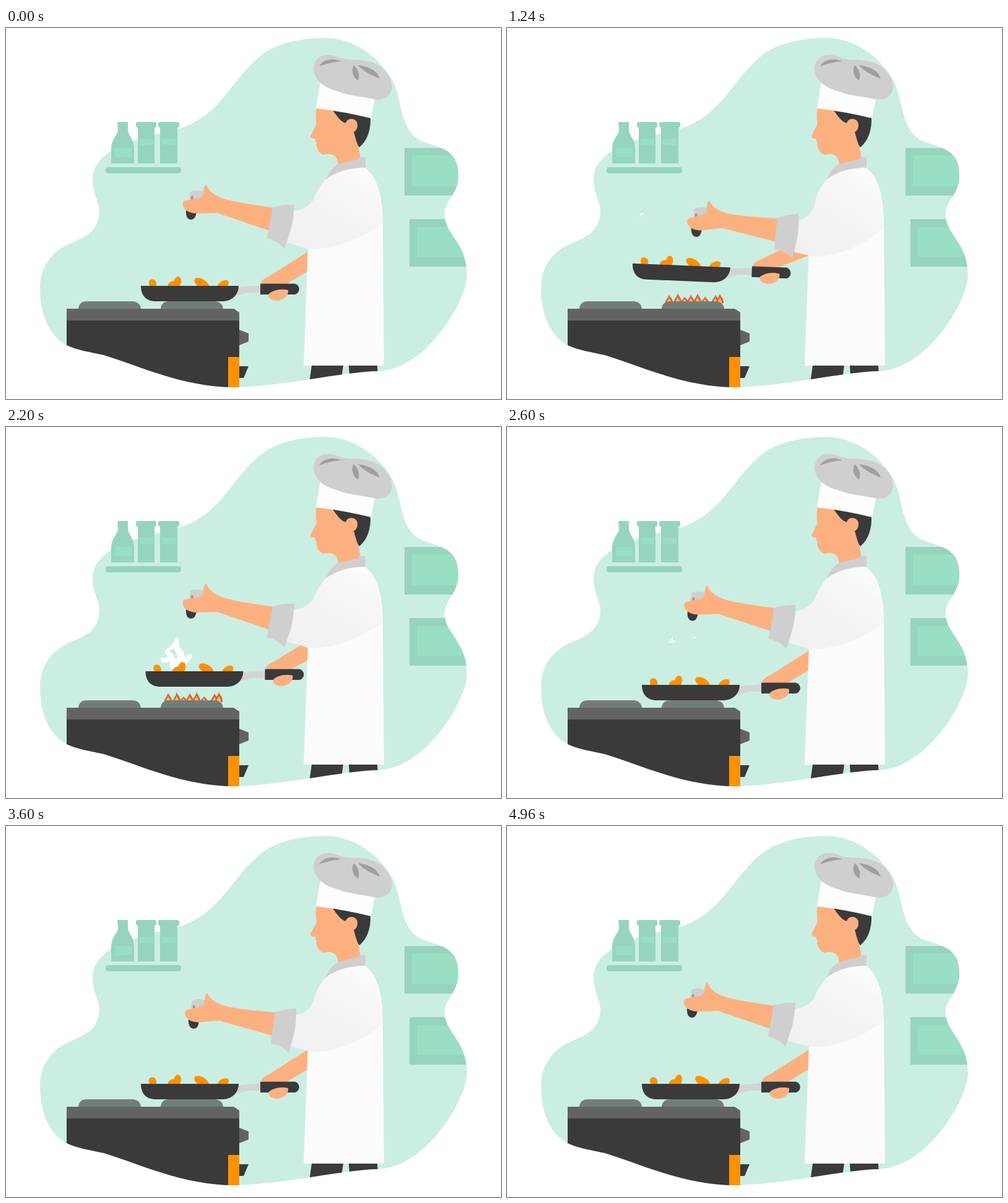
An HTML page for the animation above (5000 ms loop, 800 by 600 pixels).

```html
<!DOCTYPE html>
<html lang="en">
<head>
<meta charset="utf-8">
<title>Chef at the stove</title>
<style>
html, body { margin: 0; width: 100%; height: 100%; overflow: hidden; background: #fff; }
svg { display: block; width: 800px; height: 600px; }
.dark { fill: #3a3a3a; }
.skin { fill: #fdb07f; }
.food { fill: #ff9100; }
.cloth { fill: #cfcfcf; }
.shelf { fill: #97d4bd; }
.pale { fill: #99dfc3; }
</style>
</head>
<body>
<svg viewBox="0 0 800 600">
  <defs>
    <path id="blob" d="M510 16C560 14 600 45 622 80C642 112 634 165 672 183C700 194 731 195 731 238C731 272 706 280 709 306C712 335 745 350 745 400C745 440 680 553 600 555C545 556 455 578 376 581C290 583 215 546 158 529C135 524 115 521 98 513C70 498 55 465 55 420C55 385 75 362 100 350C130 337 148 330 151 298C151 280 140 270 140 245C140 195 215 178 280 163C350 140 365 80 415 42C440 24 475 17 510 16Z"/>
    <clipPath id="room"><use href="#blob"/></clipPath>
    <linearGradient id="sleeveShade" x1="0" y1="1" x2=".7" y2="0">
      <stop stop-color="#f0f0f0"/><stop offset=".6" stop-color="#f4f4f4"/><stop offset="1" stop-color="#fbfbfb"/>
    </linearGradient>
    <g id="flame">
      <path fill="#d9623f" d="M0-16C1-11 7-8 6 0H-6C-7-6-2-8 0-16Z"/>
      <path fill="#f8c64a" d="M0-10C1-6 4-4 3 0H-3C-4-4-1-6 0-10Z"/>
    </g>
  </defs>

  <use href="#blob" fill="#cbeee2"/>

  <g clip-path="url(#room)">
    <path class="shelf" d="M644 194H760V271H644ZM652 309H760V386H652Z"/>
    <path class="pale" d="M656 206H760V256H656ZM664 322H760V370H664Z"/>
    <path class="dark" d="M494 546H545L541 575H490ZM554 546H600L602 575H556Z"/>
  </g>

  <g class="shelf">
    <path d="M180 152h17v14c2 9 10 14 10 30v23H170v-23c0-16 9-21 11-30z"/>
    <rect x="210" y="152" width="33" height="9" rx="3"/><rect x="213" y="158" width="27" height="61"/>
    <rect x="246" y="152" width="34" height="9" rx="3"/><rect x="249" y="158" width="28" height="61"/>
    <rect x="161" y="225" width="122" height="10" rx="4"/>
  </g>
  <path class="pale" d="M176 194h27v15h-27zM216 179h22v10h-22zM252 179h22v10h-22z"/>

  <g id="flames"></g>
  <path fill="#747c7b" d="M117 455C117 446 123 442 130 442H204C212 442 218 447 218 455ZM250 455C250 446 256 442 263 442H337C345 442 351 447 351 455Z"/>
  <g clip-path="url(#room)">
    <path class="dark" d="M98 472H377V600H98ZM377 547H392L384 566H377Z"/>
    <path fill="#636363" d="M98 454H368L377 460V473H98ZM377 488L392 494V507L377 513Z"/>
    <path class="food" d="M359 532H377V600H359Z"/>
  </g>

  <g fill="#fff">
    <path id="steamA" d="M242 350L249 352C256 348 268 349 267 356C266 361 260 363 257 362C262 357 259 354 251 358L254 364L248 365L250 371L239 374C242 366 243 360 242 350ZM239 386Q244 392 244 402Q236 396 239 386Z"/>
    <path id="steamB" fill-rule="evenodd" d="M276 339C285 349 275 353 284 360C291 366 286 371 291 374C291 366 301 365 301 372C298 378 290 380 291 392L284 389C288 378 280 376 280 384C276 388 272 391 266 391C260 384 270 380 264 379C256 384 249 380 250 374C254 370 256 376 262 371C256 364 254 364 260 358C268 358 272 346 276 339ZM272 358C265 360 262 364 268 366C274 368 270 374 275 375C280 370 274 366 272 358Z"/>
  </g>
  <g id="salt" fill="#fff"></g>
  <g id="toppings">
    <path d="M250 408Q252 396 267 396Q279 398 280 404Q266 398 258 410" fill="none" stroke="#cf5233" stroke-width="3"/>
    <path d="M252 404Q256 397 268 397Q276 398 279 401" fill="none" stroke="#fff" stroke-width="2" stroke-dasharray="2 3"/>
    <path fill="#5f7a66" d="M308 374l6 0 0-5 3 4 4-5 0 6 4 2-5 1 1 5-5-4-6 3 2-5z"/>
    <circle class="dark" cx="298" cy="402" r="1.5"/>
    <g fill="#fff"><circle cx="336" cy="333" r="1.8"/><circle cx="341" cy="336" r="1.6"/><circle cx="293" cy="376" r="1.2"/><circle cx="307" cy="390" r="1.5"/></g>
  </g>

  <path id="lowerArm" class="skin"/>
  <g id="pan">
    <g class="food">
      <ellipse cx="237" cy="413" rx="6" ry="7" transform="rotate(-30 237 413)"/>
      <ellipse cx="277" cy="411" rx="6" ry="9" transform="rotate(12 277 411)"/>
      <ellipse cx="268" cy="415" rx="7" ry="5" transform="rotate(-35 268 415)"/>
      <ellipse cx="316" cy="413" rx="13" ry="7" transform="rotate(30 316 413)"/>
      <ellipse cx="351" cy="415" rx="10" ry="6" transform="rotate(-30 351 415)"/>
    </g>
    <path fill="#d4d4d4" d="M374 420L385 418L412 416V428L390 428L373 433Z"/>
    <path class="dark" d="M218 417H376C376 434 362 442 350 442H242C226 442 218 432 218 417ZM411 413.500H467A9 9 0 0 1 467 431H411Z"/>
    <path class="skin" d="M424 431C430 424 445 421 456 424C457 433 449 441 436 441C428 440 424 436 424 431Z"/>
  </g>

  <path class="skin" d="M502 128C499 145 503 153 501 157L492 175Q492 179 500 179L500 183L502 186L501 190Q505 203 513 205C524 202 532 205 535 212L538 224L574 216L568 185C575 160 570 140 530 132Z"/>
  <path class="dark" d="M527 132C535 142 540 152 550 154L562 168C565 178 567 188 571 193C584 182 590 165 589 143Z"/>
  <path class="skin" d="M549 156C549 144 568 144 568 157C568 163 565 168 561 168L553 176Z"/>
  <path fill="#fdfdfd" d="M508 88Q520 100 545 104L596 114L590 146Q545 135 501 130Z"/>
  <path class="cloth" d="M497 66C498 42 522 40 536 47C552 54 564 49 580 53C606 56 624 76 624 96C623 113 606 118 594 115C570 110 550 109 535 102C513 96 498 84 497 66Z"/>
  <path fill="#9f9f9f" d="M506 62C513 50 529 48 542 54C528 55 516 58 506 62ZM562 60C557 70 561 80 569 85C573 74 568 66 562 60ZM569 60C580 73 594 77 604 82C601 69 585 62 569 60Z"/>

  <path fill="#fbfbfb" d="M517 245C530 232 560 226 580 226C602 242 609 275 609 320L611 546H481L488 355L497 292C500 275 505 256 517 245Z"/>
  <path class="cloth" d="M516 247C523 229 532 221 540 219L569 212L570 209H581L581 226C555 226 535 231 516 247Z"/>
  <path id="sleeve" fill="url(#sleeveShade)"/>
  <g id="arm">
    <path class="cloth" d="M295 284L298 265Q308 260 323 266L314 290Z"/>
    <path fill="#999" d="M299 273l3-2 1 5-4 3z"/>
    <path class="dark" d="M291 295L308 298Q306 310 299 310Q290 309 291 295Z"/>
    <path class="skin" d="M434 291C400 286 365 281 349 275Q334 269 328 261L323 253Q319 257 319 267Q318 273 312 275L289 279Q283 282 287 290Q293 300 310 300L341 299L426 328Z"/>
    <path class="cloth" d="M431 290Q450 285 466 286Q465 310 460 327L450 357Q441 345 422 340Z"/>
  </g>
</svg>
<script>
const $ = id => document.getElementById(id);
const LOOP = 5000, HALF = LOOP / 2; // cook for one half, season for the other

// Smooth curve through [time, value] keys, flat at turning points.
function track(keys, t) {
  const i = keys.findIndex(k => k[0] > t) - 1;
  const slope = j => {
    const a = keys[j - 1], b = keys[j], c = keys[j + 1];
    return !a || !c || (b[1] - a[1]) * (c[1] - b[1]) <= 0 ? 0 : (c[1] - a[1]) / (c[0] - a[0]);
  };
  const [t0, v0] = keys[i], [t1, v1] = keys[i + 1], d = t1 - t0, u = (t - t0) / d;
  const s = u * u * (3 - 2 * u);
  return v0 + (v1 - v0) * s + d * u * (1 - u) * (slope(i) * (1 - u) - slope(i + 1) * u);
}

const times = [0, 560, 1240, 2200, HALF, LOOP];
const keyed = values => values.map((v, i) => [times[i], v]);
const panX = keyed([0, 13.5, -15, 7.5, 0, 0]);
const panY = keyed([0, -7, -33, -22, 0, 0]);
const panTilt = keyed([0, -3.8, 2.4, 0, 0, 0]);
const armDrop = [[0, 0], [530, 1], [930, .3], [1450, 1], [2120, 0], [HALF, 0]];
const heat = [[0, 0], [250, 0], [560, .85], [900, 1], [2300, 1], [2550, 0], [LOOP, 0]];
const puffA = [[0, 0], [280, 0], [560, 1], [1240, .2], [1400, 0], [LOOP, 0]];
const puffB = [[0, 0], [1650, 0], [2200, 1], [2600, .2], [2700, 0], [LOOP, 0]];

const flameX = [262, 276, 287, 297, 308, 320, 337, 344];
$('flames').innerHTML = flameX.map(() => '<use href="#flame"/>').join('');
const flames = [...$('flames').children];

const random = n => { const x = Math.sin(n * 127.1 + 3) * 43758.5453; return x - Math.floor(x); };
const grains = Array.from({ length: 26 }, (_, i) => ({
  x: (i % 2 ? 242 : 275) + 18 * random(i),
  y: 374 + 18 * random(i + 50)
}));
$('salt').innerHTML = grains.map((_, i) =>
  `<ellipse rx="${1.4 + random(i + 90)}" ry="1"/>`).join('');
const salt = [...$('salt').children];

function turn(x, y, cx, cy, degrees) {
  const a = degrees * Math.PI / 180, c = Math.cos(a), s = Math.sin(a);
  return [cx + (x - cx) * c - (y - cy) * s, cy + (x - cx) * s + (y - cy) * c];
}

function drawPan(t) {
  const dx = track(panX, t), dy = track(panY, t), tilt = track(panTilt, t);
  $('pan').setAttribute('transform', `translate(${dx} ${dy}) rotate(${tilt} 297 417)`);
  const held = (x, y) => {
    const p = turn(x, y, 297, 417, tilt);
    return `${p[0] + dx} ${p[1] + dy}`;
  };
  const lift = dy * .7;
  $('lowerArm').setAttribute('d', `M${held(412, 412)}Q${held(413, 407)} ${held(426, 401)}` +
    `L500 ${354 + lift}V${386 + lift}L${held(455, 413)}L${held(440, 422)}Z`);
}

function drawArm(t) {
  const drop = track(armDrop, t % HALF), angle = -6.1 * drop;
  $('arm').setAttribute('transform', `rotate(${angle} 652 228)`);
  const cuff = (x, y) => turn(x, y, 652, 228, angle).join(' ');
  $('sleeve').setAttribute('d', `M517 245C507 256 500 268 497 ${278 + 12 * drop}` +
    `Q${cuff(484, 295)} ${cuff(463, 296)}L${cuff(454, 347)}L${cuff(488, 357)}` +
    `C${cuff(530, 360)} ${cuff(575, 340)} 609 ${316 + 10 * drop}C606 270 592 232 580 226C555 227 530 234 517 245Z`);
}

function drawSteam(id, x, y, scale, dx, dy) {
  $(id).setAttribute('transform', `translate(${x + dx} ${y + dy}) scale(${scale}) translate(${-x} ${-y})`);
}

function drawFalling(t) {
  const fall = (t - 2600) / 400;
  $('salt').style.opacity = fall > 0 && t < 3300 ? 1 : 0;
  salt.forEach((grain, i) => {
    const late = i ? fall : fall * .2;
    const x = 303 + (grains[i].x - 303) * Math.min(late, 1);
    const y = 340 + (grains[i].y - 340) * late;
    grain.setAttribute('transform', `translate(${x} ${y}) rotate(${-25 + 40 * random(i + 7)})`);
    grain.style.opacity = y < 418 ? 1 : 0;
  });
  $('toppings').setAttribute('transform', `translate(0 ${(t - 4160) * .1})`);
  $('toppings').style.opacity = t > 4480 ? 0 : Math.min(1, Math.max(0, (t - 3700) / 150));
}

function draw(now) {
  const t = now % LOOP;
  drawPan(t);
  drawArm(t);
  const h = track(heat, t);
  flames.forEach((flame, i) => {
    const size = (i % 3 === 2 ? .65 : .95) + .08 * Math.sin(t / 70 + i * 2);
    flame.setAttribute('transform', `translate(${flameX[i]} 445) scale(1 ${h * size})`);
  });
  $('flames').style.opacity = h > .02 ? 1 : 0;
  drawSteam('steamA', 250, 372, track(puffA, t), (560 - t) * .048, (560 - t) * .1);
  drawSteam('steamB', 275, 370, track(puffB, t), (2200 - t) * .02, (2200 - t) * .06);
  drawFalling(t);
  requestAnimationFrame(() => draw(performance.now()));
}
draw(performance.now());
</script>
</body>
</html>
```
